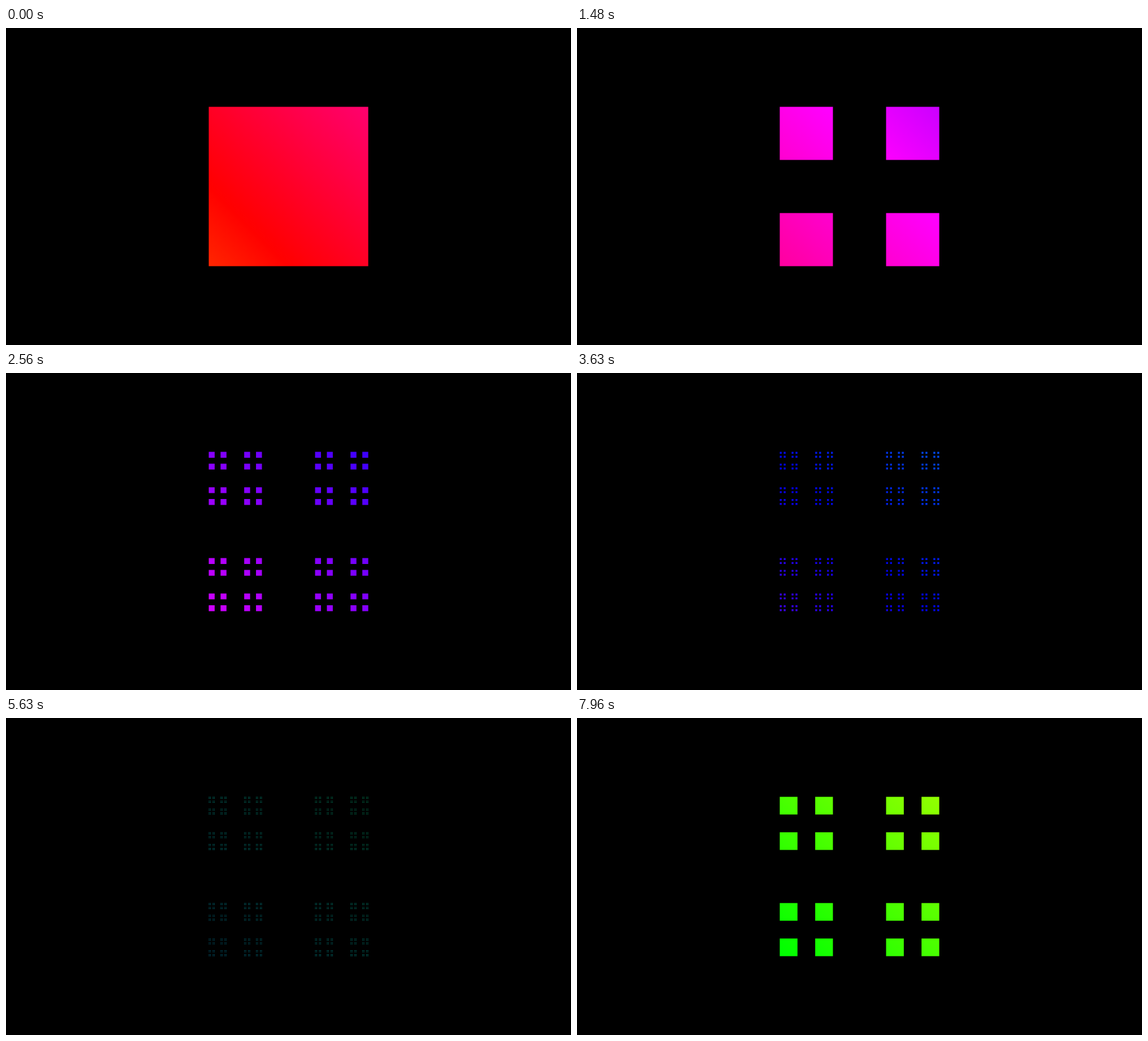
An HTML page with a canvas for the animation above (8000 ms loop, 999x561 px).

```html
<!DOCTYPE html>
<html lang="en">
<head>
<meta charset="utf-8">
<title>Cantor dust</title>
<style>
  html, body { margin: 0; width: 100%; height: 100%; overflow: hidden; background: #000; }
  canvas { display: block; }
</style>
</head>
<body>
<canvas id="stage" width="999" height="561"></canvas>
<script>
const ctx = document.getElementById('stage').getContext('2d');

const LOOP = 8000;
const HOLD = 770;          // time spent on each level
const START = 90;          // extra time on the first level
const DEEPEST = 6;
const SIZE = 282;
const LEFT = 358.5;
const TOP = 139.5;
const HUE_START = 369;
const HUE_SPEED = 31.2;    // degrees per second
const HUE_SPAN = 35;       // across the diagonal
const STOPS = 28;
const OPACITY = [1, 1, 1, 1, 0.9, 0.5, 0.6];

// Left ends of the Cantor set's intervals after a number of cuts.
function cantor(level) {
  let starts = [0];
  let length = SIZE;
  for (let i = 0; i < level; i++) {
    length /= 3;
    starts = starts.flatMap(s => [s, s + 2 * length]);
  }
  return { starts, length };
}

const levels = Array.from({ length: DEEPEST + 1 }, (_, i) => {
  const { starts, length } = cantor(i);
  const path = new Path2D();
  for (const x of starts) {
    for (const y of starts) path.rect(LEFT + x, TOP + y, length, length);
  }
  return path;
});

function levelAt(ms) {
  const step = Math.max(0, Math.floor((ms - START) / HOLD));
  return DEEPEST - Math.abs(DEEPEST - step);
}

function rainbow(ms) {
  const gradient = ctx.createLinearGradient(LEFT, TOP + SIZE, LEFT + SIZE, TOP);
  const base = HUE_START - HUE_SPEED * ms / 1000;
  for (let i = 0; i <= STOPS; i++) {
    const u = i / STOPS;
    const hue = (base - HUE_SPAN * u + 360) % 360;
    gradient.addColorStop(u, `hsl(${hue}, 100%, 50%)`);
  }
  return gradient;
}

function draw() {
  const ms = performance.now() % LOOP;
  const level = levelAt(ms);
  ctx.globalAlpha = 1;
  ctx.fillStyle = '#000';
  ctx.fillRect(0, 0, 999, 561);
  ctx.globalAlpha = OPACITY[level];
  ctx.fillStyle = rainbow(ms);
  ctx.fill(levels[level]);
  requestAnimationFrame(draw);
}

draw();
</script>
</body>
</html>
```
